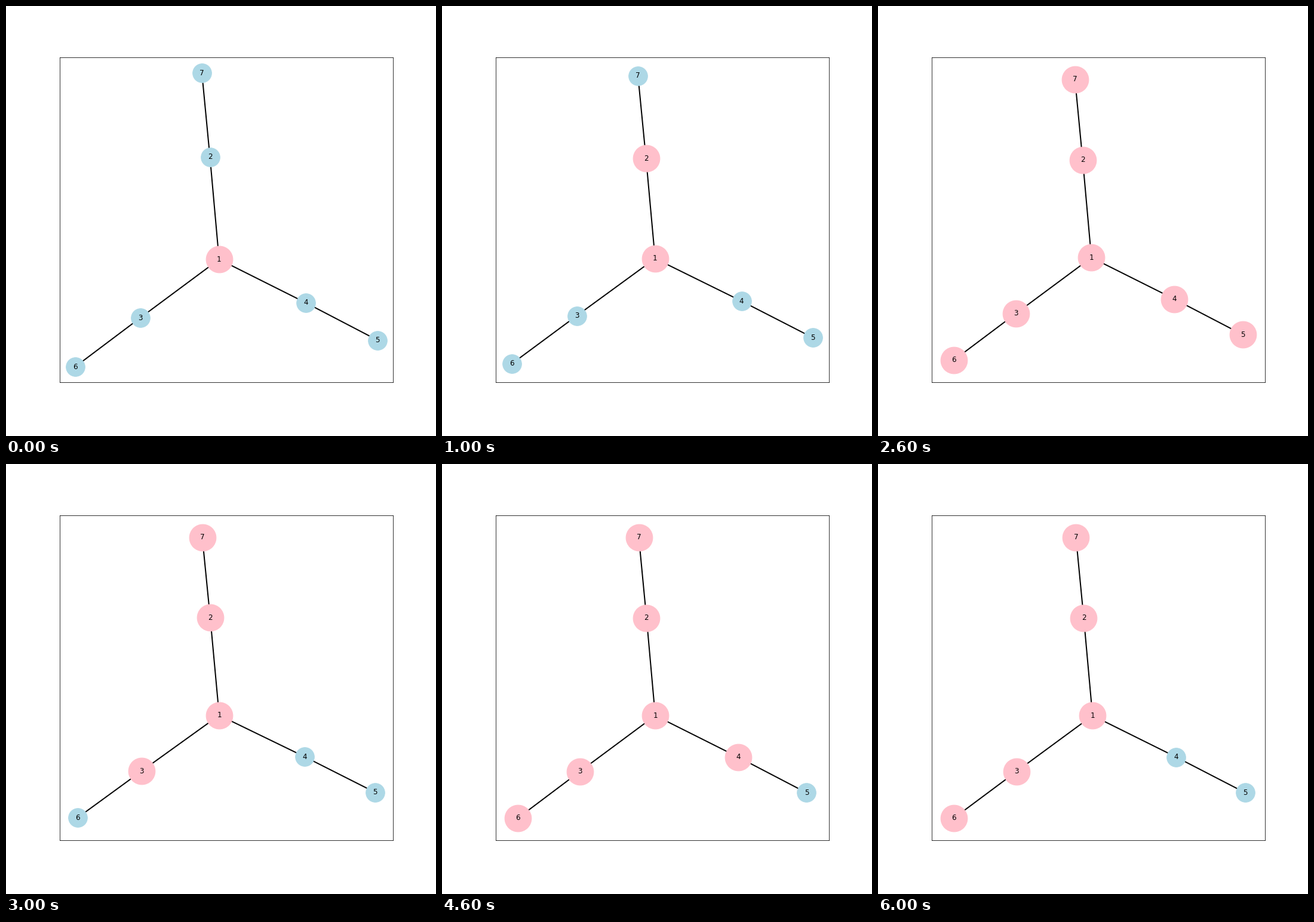
A matplotlib script that plays this animation: 720 px wide and 720 px high, repeating every 7 s.

```python
import numpy as np
import matplotlib.pyplot as plt
from matplotlib.animation import FuncAnimation
from matplotlib.collections import LineCollection

SIZE, DPI = 720, 72
LEFT, RIGHT, TOP, BOTTOM = 90, 648, 86.4, 630

# Node centres in stage pixels, for nodes 1 to 7
NODES = np.array([
    (356.8, 424.2), (341.5, 253), (225, 522), (502.1, 497),
    (622, 559.5), (116, 604), (328, 112),
])
EDGES = np.array([(1, 2), (1, 3), (1, 4), (2, 7), (3, 6), (4, 5)]) - 1

# Each step: active nodes, then the x and y extent the graph is fitted into
STEPS = [
    ("1", (116, 622), (112, 604)),
    ("12", (117, 621), (117, 599)),
    ("1234567", (127, 611), (123, 593)),
    ("1237", (120, 618), (123, 592.2)),
    ("123467", (127, 610.4), (123, 593)),
    ("127", (117, 621), (123, 595)),
    ("12367", (127, 615), (123, 593)),
]

fig = plt.figure(figsize=(SIZE / DPI, SIZE / DPI), dpi=DPI, facecolor="white")
ax = fig.add_axes([LEFT / SIZE, 1 - BOTTOM / SIZE,
                   (RIGHT - LEFT) / SIZE, (BOTTOM - TOP) / SIZE])
ax.set(xlim=(LEFT, RIGHT), ylim=(BOTTOM, TOP), xticks=[], yticks=[])
ax.set_autoscale_on(False)

lines = LineCollection([], colors="black", linewidths=2, zorder=1)
ax.add_collection(lines, autolim=False)
discs = ax.scatter(*NODES.T, s=1000, linewidths=1, zorder=2)
labels = [ax.text(x, y, str(i + 1), size=12, family="DejaVu Sans",
                  ha="center", va="center", zorder=3)
          for i, (x, y) in enumerate(NODES)]


def fit(xs, ys):
    """Stretch the layout so that it fills the given extents."""
    low, high = NODES.min(axis=0), NODES.max(axis=0)
    start, end = np.array([xs, ys]).T
    return start + (NODES - low) * ((end - start) / (high - low))


def draw(step):
    active, xs, ys = STEPS[step]
    pos = fit(xs, ys)
    on = [str(i + 1) in active for i in range(len(NODES))]
    colors = ["pink" if a else "lightblue" for a in on]

    lines.set_segments(pos[EDGES])
    discs.set_offsets(np.floor(pos + 0.5) + 0.5)  # whole pixel centres
    discs.set_sizes([2000 if a else 1000 for a in on])
    discs.set_facecolor(colors)
    discs.set_edgecolor(colors)
    for label, p in zip(labels, pos):
        label.set_position(p)
    return [lines, discs, *labels]


anim = FuncAnimation(fig, draw, frames=len(STEPS), interval=1000,
                     repeat=True, repeat_delay=0)
plt.show()
```
